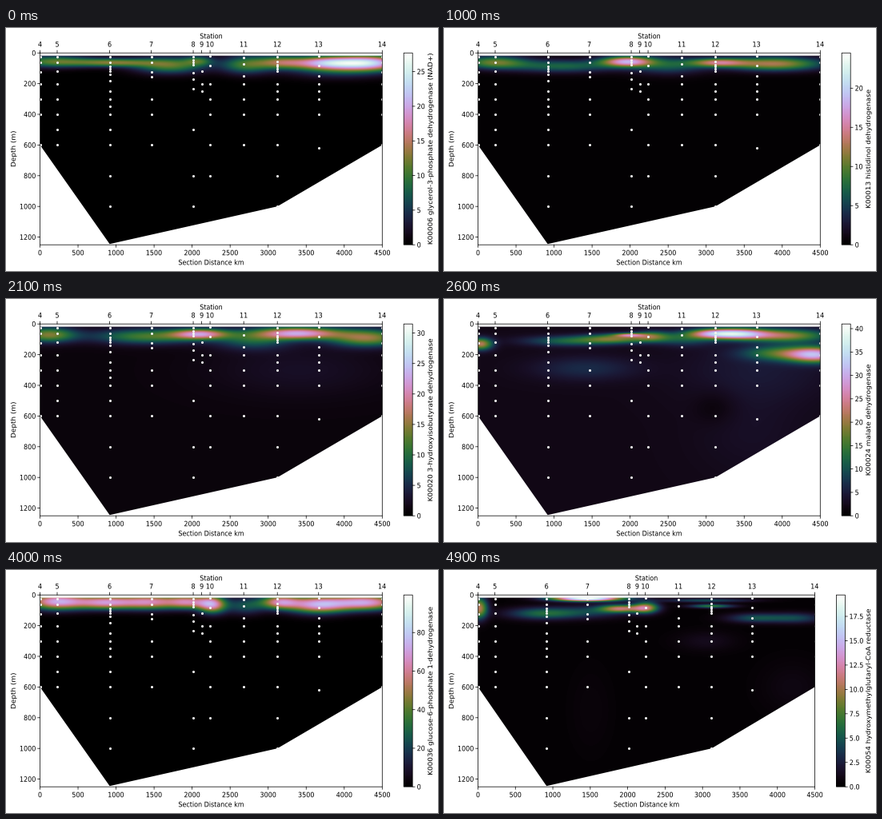
Recreate the animation shown at these times as a matplotlib script. Size 540 by 304 pixels, loop 5000 ms.

```python
import math

import numpy as np
import matplotlib.pyplot as plt
from matplotlib.animation import FuncAnimation
from matplotlib.patches import PathPatch, Polygon, Rectangle
from matplotlib.path import Path
from matplotlib.textpath import TextPath
from matplotlib.transforms import Affine2D

W, H, DPI = 540, 304, 100
HOLD, INTERVAL = 5, 100
LEFT, TOP, BOTTOM = 42.5, 31.2, 271.2
MAX_KM, MAX_DEPTH = 4500, 1250
EM_X, EM_Y = 8.0, 8.9          # one em in pixels: the whole chart is slightly tall
CAP = 0.73
PT = 72 / DPI

STATIONS = {
    4: (0, [25, 60, 125, 200, 300, 400, 600]),
    5: (226, [25, 60, 120, 200, 300, 400, 500, 600]),
    6: (916, [25, 60, 85, 105, 120, 140, 180, 250, 300, 350, 400, 500, 600, 800, 1000]),
    7: (1463, [25, 60, 125, 155, 300, 400, 600]),
    8: (2015, [25, 45, 60, 75, 130, 170, 235, 500, 800, 1000]),
    9: (2126, [120, 200, 250]),
    10: (2236, [20, 80, 200, 300, 400, 600, 800]),
    11: (2679, [30, 70, 150, 200, 300, 400, 600]),
    12: (3121, [25, 55, 75, 90, 105, 120, 200, 250, 300, 400, 600, 800, 1000]),
    13: (3663, [20, 80, 150, 200, 250, 300, 400, 620]),
    14: (4500, [25, 60, 125, 200, 300, 400, 600]),
}
SEAFLOOR = [(0, 18), (0, 600), (916, 1245), (3121, 1000), (4500, 600), (4500, 18)]

KM = np.linspace(0, MAX_KM, 214)
DEPTH = np.linspace(0, MAX_DEPTH, 320)
genes = []


def bell(values, centre, spread):
    return np.exp(-0.5 * ((values - centre) / spread) ** 2)


def add_gene(name, top, step, blobs, base=0.0, low=0.0, decimals=0):
    """Each blob is (km, depth, km spread, depth spread, strength 0..1)."""
    field = np.full((DEPTH.size, KM.size), base)
    for km, depth, wide, tall, strength in blobs:
        field += strength * np.outer(bell(DEPTH, depth, tall), bell(KM, km, wide))
    genes.append(dict(name=name, top=top, step=step, low=low, decimals=decimals,
                      field=np.clip(field, 0, 1)))


add_gene("K00006 glycerol-3-phosphate dehydrogenase (NAD+)", 27.7, 5, [
    (150, 55, 350, 28, .38), (950, 62, 380, 20, .42), (1700, 80, 330, 38, .40),
    (2080, 50, 130, 22, .25), (2700, 75, 230, 42, .36), (3150, 60, 220, 30, .36),
    (3750, 62, 330, 30, .62), (4350, 62, 330, 34, .70), (3950, 110, 480, 38, .22)])
add_gene("K00012 UDPglucose 6-dehydrogenase", 16.1, 2, [
    (400, 125, 230, 28, .25), (1450, 300, 270, 40, .12), (1900, 30, 330, 9, .62),
    (2126, 115, 50, 42, .42), (2126, 40, 70, 20, .2), (3150, 78, 260, 10, .34),
    (3800, 84, 320, 17, .50), (4420, 88, 330, 22, .60), (4050, 42, 420, 18, .25),
    (2700, 240, 200, 12, .05), (4420, 300, 260, 45, .14), (3120, 780, 170, 110, .10),
    (2200, 750, 1300, 300, .03), (3900, 400, 500, 150, .03)], base=.02)
add_gene("K00013 histidinol dehydrogenase", 24.5, 5, [
    (200, 60, 300, 30, .40), (1100, 85, 500, 30, .28), (1950, 55, 240, 24, .65),
    (2500, 80, 350, 40, .25), (3150, 62, 260, 20, .45), (3900, 70, 450, 32, .50)], base=.01)
add_gene("K00015 glyoxylate reductase", 38.4, 5, [
    (1960, 60, 130, 24, .80), (1780, 55, 300, 28, .30), (2450, 65, 380, 34, .28),
    (3120, 60, 200, 12, .32), (3000, 75, 420, 40, .20), (4000, 50, 480, 24, .26),
    (1430, 120, 300, 20, .26), (800, 110, 420, 40, .09), (250, 85, 170, 32, .20),
    (900, 65, 350, 14, .14), (2126, 150, 55, 60, .18), (3700, 165, 420, 40, .08)])
add_gene("K00020 3-hydroxyisobutyrate dehydrogenase", 31.5, 5, [
    (100, 70, 250, 35, .42), (1400, 80, 500, 35, .35), (2100, 65, 260, 24, .55),
    (2800, 100, 350, 45, .25), (3400, 60, 380, 28, .65), (4300, 90, 350, 40, .45),
    (3400, 300, 800, 120, .05)], base=.03)
add_gene("K00024 malate dehydrogenase", 41.0, 5, [
    (20, 130, 110, 28, .48), (1200, 110, 420, 24, .24), (1800, 95, 300, 22, .34),
    (1980, 72, 140, 9, .38), (2270, 80, 170, 24, .30), (2700, 95, 280, 32, .20),
    (3050, 62, 220, 22, .42), (3420, 64, 270, 25, .66), (4050, 75, 380, 30, .42),
    (4450, 200, 260, 36, .62), (3950, 190, 330, 34, .28), (1400, 290, 480, 55, .11),
    (3700, 300, 700, 150, .06), (3120, 540, 200, 80, -.04), (3600, 700, 500, 200, .03)], base=.05)
add_gene("K00031 isocitrate dehydrogenase", 93.5, 20, [
    (240, 48, 250, 35, .74), (0, 90, 330, 40, .32), (950, 85, 380, 34, .32),
    (1500, 75, 320, 36, .26), (1950, 55, 220, 26, .42), (2400, 65, 260, 38, .38),
    (2850, 80, 330, 48, .36), (3120, 100, 140, 14, -.25), (3680, 65, 260, 40, .58),
    (4250, 50, 350, 36, .68), (3900, 150, 560, 44, .20), (2800, 300, 600, 180, .05)],
    base=.04, low=.2)
add_gene("K00033 6-phosphogluconate dehydrogenase", 72.5, 10, [
    (250, 55, 330, 34, .65), (1000, 60, 380, 30, .42), (1800, 60, 350, 32, .50),
    (2250, 65, 180, 36, .42), (2800, 75, 300, 38, .30), (3500, 60, 350, 36, .65),
    (4300, 60, 380, 34, .55)])
add_gene("K00036 glucose-6-phosphate 1-dehydrogenase", 99.5, 20, [
    (200, 42, 270, 38, .70), (850, 48, 280, 32, .62), (1450, 45, 270, 35, .58),
    (1950, 45, 190, 32, .52), (2260, 62, 130, 40, .62), (2700, 70, 180, 40, .24),
    (3150, 45, 180, 32, .56), (3650, 62, 280, 40, .68), (4300, 48, 320, 36, .68)])
add_gene("K00054 hydroxymethylglutaryl-CoA reductase", 19.7, 2.5, [
    (0, 85, 80, 50, .52), (850, 120, 330, 28, .28), (1450, 22, 330, 13, 1.0),
    (1900, 88, 200, 18, .50), (2240, 82, 120, 26, .50), (1500, 110, 350, 30, .16),
    (3120, 72, 210, 9, .34), (3050, 35, 420, 9, .22), (3700, 150, 260, 22, .22),
    (4250, 150, 260, 24, .20), (3050, 300, 280, 45, .05), (1500, 750, 200, 200, .015),
    (4200, 600, 300, 120, .03)], base=.012, decimals=1)

fig = plt.figure(figsize=(W / DPI, H / DPI), dpi=DPI, facecolor="white")
ax = fig.add_axes([0, 0, 1, 1])
outlines = {}


def outline_of(string):
    """Glyph outline of a string with its left and right ink edges, kept for reuse."""
    if string not in outlines:
        path = TextPath((0, 0), string, size=1)
        xs = path.vertices[path.codes != Path.CLOSEPOLY, 0]
        outlines[string] = path, xs.min(), xs.max()
    return outlines[string]


def text(x, y, string, align=0.5, rotation=0):
    """Put the baseline on y (on x when rotated), aligned by the ink's extent."""
    path, start, end = outline_of(string)
    place = (Affine2D().translate(-start - align * (end - start), 0)
             .rotate_deg(rotation).scale(EM_X, -EM_Y).translate(x, y))
    return place.transform_path(path)


def centred(x, y, string, align=0.5):
    return text(x, y + CAP * EM_Y / 2, string, align)


def build_scene(gene):
    shift = 6.8 if gene["decimals"] else 0
    right, bar = 470.3 - shift, 497.2 - shift
    middle, half_height = (LEFT + right) / 2, (TOP + BOTTOM) / 2

    def px(km):
        return LEFT + km / MAX_KM * (right - LEFT)

    def py(depth):
        return TOP + depth / MAX_DEPTH * (BOTTOM - TOP)

    def box(x0, x1):
        return ax.add_patch(Rectangle((x0, TOP), x1 - x0, BOTTOM - TOP, fill=False, ec="black",
                                      lw=0.75 * PT, snap=False, zorder=6))

    style = dict(cmap="cubehelix", vmin=0, vmax=1, aspect="auto")
    section = ax.imshow(gene["field"], extent=(LEFT, right, BOTTOM, TOP),
                        interpolation="bilinear", **style)
    section.set_clip_path(Polygon([(px(km), py(d)) for km, d in SEAFLOOR],
                                  transform=ax.transData))
    scale = ax.imshow(np.linspace(1, 0, 256)[:, None],
                      extent=(bar, bar + 11, BOTTOM, TOP), **style)

    dots = [(px(km), py(d)) for km, depths in STATIONS.values() for d in depths]
    cloud = ax.scatter(*zip(*dots), s=(3.1 * PT) ** 2, c="#f2f2f2", lw=0, zorder=5)
    cloud.set_clip_path(Rectangle((LEFT, TOP), right - LEFT, BOTTOM - TOP,
                                  transform=ax.transData))

    ticks = []
    words = [text(middle, 13.2, "Station"),
             text(middle, 296.3, "Section Distance km"),
             text(11.8, half_height, "Depth (m)", rotation=90),
             text(533, half_height, gene["name"], rotation=90)]
    for km in range(0, MAX_KM + 1, 500):
        ticks.append((px(km), BOTTOM, px(km), BOTTOM + 3.1))
        words.append(centred(px(km), 281, str(km)))
    for depth in range(0, MAX_DEPTH, 200):
        ticks.append((LEFT - 2.8, py(depth), LEFT, py(depth)))
        words.append(centred(36.8, py(depth), str(depth), align=1))
    for station, (km, _) in STATIONS.items():
        ticks.append((px(km), TOP - 3.1, px(km), TOP))
        words.append(centred(px(km), 20.2, str(station)))

    low, top, step = gene["low"], gene["top"], gene["step"]
    for k in range(math.ceil(low / step), int(top / step) + 1):
        y = BOTTOM - (k * step - low) / (top - low) * (BOTTOM - TOP)
        ticks.append((bar + 11, y, bar + 13.8, y))
        words.append(centred(bar + 17, y, f"{k * step:.{gene['decimals']}f}", align=0))

    xs = [x for x0, _, x1, _ in ticks for x in (x0, x1, np.nan)]
    ys = [y for _, y0, _, y1 in ticks for y in (y0, y1, np.nan)]
    marks, = ax.plot(xs, ys, color="black", lw=0.75 * PT, snap=False)
    letters = ax.add_patch(PathPatch(Path.make_compound_path(*words), fc="black",
                                     lw=0, snap=False))
    return [section, scale, cloud, marks, letters, box(LEFT, right), box(bar, bar + 11)]


scenes = [build_scene(gene) for gene in genes]
ax.set(xlim=(0, W), ylim=(H, 0))
ax.axis("off")


def draw(frame):
    current = frame // HOLD % len(scenes)
    for index, scene in enumerate(scenes):
        for artist in scene:
            artist.set_visible(index == current)
    return scenes[current]


anim = FuncAnimation(fig, draw, frames=HOLD * len(scenes), interval=INTERVAL,
                     init_func=lambda: draw(0), repeat=True, repeat_delay=0)
plt.show()
```
